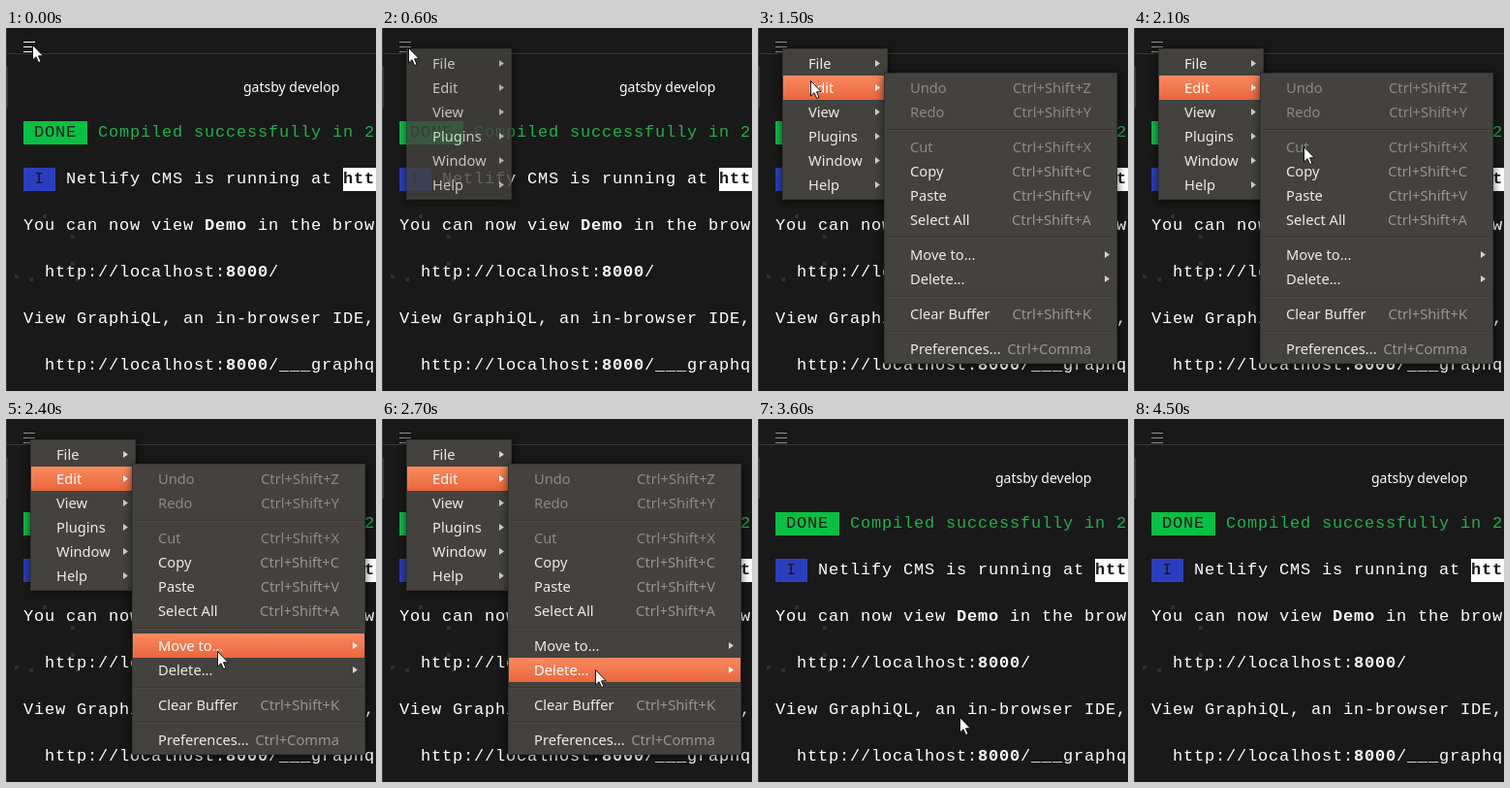
An HTML page that plays this animation: 382x374 px, repeating every 4900 ms.

```html
<!DOCTYPE html>
<html lang="en">
<head>
<meta charset="utf-8">
<title>Terminal menu</title>
<style>
  html, body { margin: 0; width: 100%; height: 100%; overflow: hidden; background: #191919; }
  svg { display: block; width: 382px; height: 374px; }
  text { white-space: pre; }
  .term { font: 17px "Liberation Mono", monospace; letter-spacing: .798px; fill: #fff; }
  .bold { font-weight: bold; }
  .title { font: 14px "Noto Sans", sans-serif; fill: #fff; }
  .panel { fill: #43423e; stroke: #35342f; filter: drop-shadow(0 1px 5px rgba(0, 0, 0, .65)); }
  .item text { font: 14.7px "Noto Sans", sans-serif; fill: #eeebe4; }
  .item .keys { fill: #99968f; text-anchor: end; }
  .item.off text { fill: #8b8982; }
  .item .arrow { fill: #d5d2ca; }
  .item .bar { visibility: hidden; }
  .item.on .bar { visibility: inherit; }
  .item.on text, .item.on .arrow { fill: #fff; }
</style>
</head>
<body>
<svg viewBox="0 0 382 374">
  <defs>
    <linearGradient id="orange" x2="0" y2="1">
      <stop offset="0" stop-color="#fb8a60"/>
      <stop offset="1" stop-color="#e9663c"/>
    </linearGradient>
  </defs>
  <rect width="382" height="374" fill="#191919"/>
  <path d="M0 26.5H382M.5 0V374" stroke="#363636"/>
  <rect y="40" width="2" height="42" fill="#3a3a3a"/>
  <path id="dots" fill="#40272b"/>
  <path id="icon" d="M18 14.5h12M18 19.5h12M18 24.5h12"/>
  <text class="title" x="245" y="66">gatsby develop</text>
  <g id="terminal"></g>
  <g id="mainMenu"></g>
  <g id="editMenu"></g>
  <path id="cursor" d="M.5 .5V16L4 12.7L6.6 18.6L9 17.5L6.5 11.8H11.3Z" fill="#fff" stroke="#111"/>
</svg>
<script>
const $ = id => document.getElementById(id);
const CELL = 11, LEFT = 18;

function add(parent, tag, attrs, content = '') {
  const el = document.createElementNS('http://www.w3.org/2000/svg', tag);
  for (const key in attrs) el.setAttribute(key, attrs[key]);
  el.textContent = content;
  return parent.appendChild(el);
}

$('dots').setAttribute('d',
  [[38, 192], [67, 213], [67, 241], [9, 254], [24, 257], [72, 257]]
    .map(([x, y]) => `M${x} ${y}h4v4h-4z`).join(''));

// Terminal runs: line, column, text, style
const GREEN = '#22b04c', DARK = '#191919';
[
  [0, 0, ' DONE ', { fill: DARK, bg: '#08c043' }],
  [0, 7, 'Compiled successfully in 2', { fill: GREEN }],
  [1, 0, ' I ', { fill: DARK, bg: '#2a3fc0' }],
  [1, 4, 'Netlify CMS is running at', {}],
  [1, 30, 'http', { fill: DARK, bg: '#fff', bold: true }],
  [2, 0, 'You can now view', {}],
  [2, 17, 'Demo', { bold: true }],
  [2, 22, 'in the browser.', {}],
  [3, 2, 'http://localhost:', {}],
  [3, 19, '8000', { bold: true }],
  [3, 23, '/', {}],
  [4, 0, 'View GraphiQL, an in-browser IDE, to', {}],
  [5, 2, 'http://localhost:', {}],
  [5, 19, '8000', { bold: true }],
  [5, 23, '/___graphql', {}]
].forEach(([line, col, str, { fill = '#fff', bg, bold }]) => {
  const x = LEFT + col * CELL, y = 96 + line * 48;
  if (bg) add($('terminal'), 'rect', { x, y, width: str.length * CELL, height: 24, fill: bg });
  add($('terminal'), 'text', { class: bold ? 'term bold' : 'term', x, y: y + 16, style: `fill:${fill}` }, str);
});

// Builds a menu; an item is [label, shortcut, disabled], null is a separator
function buildMenu(group, x, y, width, height, items) {
  add(group, 'rect', { class: 'panel', x: x - .5, y: y + .5, width: width + 1, height: height - 1 });
  let top = y + 3;
  return items.flatMap(item => {
    if (!item) {
      add(group, 'path', { d: `M${x + 1} ${top + 5.5}h${width - 2}`, stroke: '#383733' });
      add(group, 'path', { d: `M${x + 1} ${top + 6.5}h${width - 2}`, stroke: '#4d4c47' });
      top += 11;
      return [];
    }
    const [label, keys, disabled] = item;
    const row = add(group, 'g', { class: disabled ? 'item off' : 'item' });
    add(row, 'rect', { class: 'bar', x, y: top, width, height: 25, fill: 'url(#orange)' });
    add(row, 'text', { x: x + 26, y: top + 18 }, label);
    if (keys === '>') add(row, 'path', { class: 'arrow', d: `M${x + width - 12} ${top + 9}l5 3.5l-5 3.5z` });
    else if (keys) add(row, 'text', { class: 'keys', x: x + width - 26, y: top + 18 }, keys);
    top += 25;
    return [row];
  });
}

const mainRows = buildMenu($('mainMenu'), 26, 21, 107, 156,
  ['File', 'Edit', 'View', 'Plugins', 'Window', 'Help'].map(label => [label, '>']));
const editRows = buildMenu($('editMenu'), 131, 46, 239, 300, [
  ['Undo', 'Ctrl+Shift+Z', true], ['Redo', 'Ctrl+Shift+Y', true], null,
  ['Cut', 'Ctrl+Shift+X', true], ['Copy', 'Ctrl+Shift+C'], ['Paste', 'Ctrl+Shift+V'],
  ['Select All', 'Ctrl+Shift+A'], null,
  ['Move to...', '>'], ['Delete...', '>'], null,
  ['Clear Buffer', 'Ctrl+Shift+K'], null,
  ['Preferences...', 'Ctrl+Comma']
]);

// Held steps: time, cursor x, cursor y, hovered main row, hovered edit row
const NONE = -1, AWAY = -40;
const steps = [
  [0, 27, 17, NONE, NONE],
  [500, 27, 19, NONE, NONE],
  [600, 27, 20, NONE, NONE],
  [700, 30, 26, 0, NONE],
  [800, 36, 37, 0, NONE],
  [900, 44, 48, 0, NONE],
  [1000, 50, 53, 1, NONE],
  [1100, 57, 54, 1, NONE],
  [1300, 54, 54, 1, NONE],
  [1700, 63, 58, 1, NONE],
  [1800, 86, 64, 1, NONE],
  [1900, 118, 70, 1, NONE],
  [2000, 148, 88, 1, NONE],
  [2100, 175, 122, 1, NONE],
  [2200, 199, 158, 1, 3],
  [2300, 213, 204, 1, 5],
  [2400, 218, 239, 1, 6],
  [2700, 220, 258, 1, 7],
  [2800, 225, 298, 1, 8],
  [2900, 228, 336, 1, 9],
  [3100, 224, 336, 1, 9],
  [3200, 219, 337, 1, 9],
  [3300, 215, 337, 1, 9],
  [3600, 208, 307, NONE, NONE],
  [3700, 191, 262, NONE, NONE],
  [3800, 171, 208, NONE, NONE],
  [3900, 150, 148, NONE, NONE],
  [4000, 128, 84, NONE, NONE],
  [4100, 107, 30, NONE, NONE],
  [4200, 94, 15, NONE, NONE],
  [4300, 83, 4, NONE, NONE],
  [4400, 75, -6, NONE, NONE],
  [4500, AWAY, AWAY, NONE, NONE]
];
const LOOP = 4900;

function menuOpacity(t) {
  if (t < 500 || t >= 3600) return 0;
  return t < 600 ? .4 : t < 700 ? .82 : 1;
}

function draw(t) {
  const [, x, y, mainHover, editHover] = steps.findLast(step => step[0] <= t);
  $('cursor').setAttribute('transform', `translate(${x} ${y})`);
  $('icon').setAttribute('stroke', t < 500 ? '#fff' : '#8f8f8f');
  $('mainMenu').setAttribute('opacity', menuOpacity(t));
  $('editMenu').setAttribute('visibility', t >= 1500 && t < 3600 ? 'visible' : 'hidden');
  mainRows.forEach((row, i) => row.classList.toggle('on', i === mainHover));
  editRows.forEach((row, i) => row.classList.toggle('on', i === editHover));
}

const start = performance.now();
function tick() {
  draw((performance.now() - start) % LOOP);
  requestAnimationFrame(tick);
}
tick();
</script>
</body>
</html>
```
